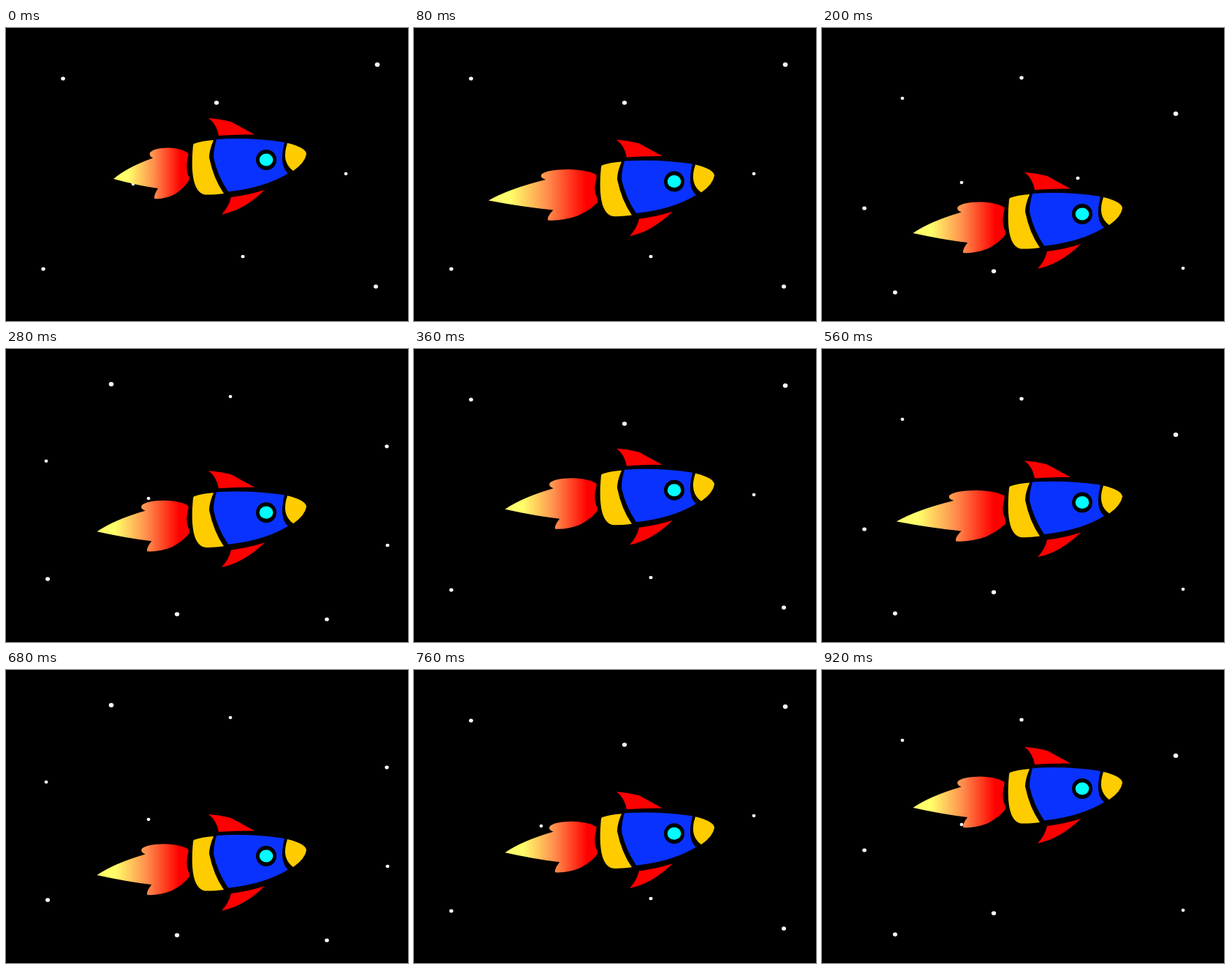
An HTML page with a canvas that plays this animation: 550x400 px, repeating every 0.96 s.

```html
<!DOCTYPE html>
<html lang="en">
<head>
<meta charset="utf-8">
<title>Rocket</title>
<style>
  html, body { margin: 0; width: 100%; height: 100%; overflow: hidden; background: #000; }
  canvas { display: block; }
</style>
</head>
<body>
<canvas id="stage" width="550" height="400"></canvas>
<script>
const ctx = document.getElementById('stage').getContext('2d');
const STEP = 40, STEPS = 24, PIVOT = 247;

// Star centres of each sky, largest star first
const skies = [
  [[508, 50], [288, 102], [506, 353], [78, 69], [51, 329], [324, 312], [174, 213], [465, 199]],
  [[484, 117], [235, 332], [100, 361], [58, 246], [273, 68], [350, 205], [191, 211], [110, 96], [494, 328]],
  [[144, 48], [234, 362], [57, 314], [439, 369], [521, 133], [522, 268], [307, 65], [55, 153], [195, 204]]
];

const shape = (color, d) => ({ color, path: new Path2D(d) });
const fire = ctx.createLinearGradient(167, 0, 239, 0);
['#ffff6a', '#ff8c4c', '#ff0000'].forEach((color, i) => fire.addColorStop(i / 2, color));

const flame = shape(fire, `M147 206Q166 190 201 177.5Q195 175 197 170Q203 163.5 222 163.5Q242 164 250 172
  Q245 188 249 201L252 205Q246 217 231 227Q217 234 203 233Q202 228 208 219Q180 215 147 206`);
const hull = [
  shape('#f00', 'M277 123Q293 124 308 128L340 145.5Q314 145 291 147Q288 131 277 123'),
  shape('#f00', 'M308 231Q332 228 354 221Q325 249 295 254.5Q305 244 308 231'),
  shape('#fc0', 'M257 158Q268 154 284 153Q278 167 278 177Q284 206 298 226Q282 228 272 227.5Q250 223 256 160'),
  shape('#0a32ff', 'M288 152Q335 149 381 156Q373 188 386 198.5Q354 218 304 223.5Q289 201 284 177Q284 165 288 152'),
  shape('#fc0', 'M385 157Q410 163 411 172Q409 184 393 195Q376 183 385 157')
];

function fill({ color, path }) {
  ctx.fillStyle = color;
  ctx.fill(path);
}

function dot(color, x, y, rx, ry) {
  ctx.fillStyle = color;
  ctx.beginPath();
  ctx.ellipse(x, y, rx, ry, 0, 0, 2 * Math.PI);
  ctx.fill();
}

function drawStars(step) {
  skies[Math.floor(step / 3) % skies.length].forEach(([x, y], i) => {
    const r = Math.max(2.4, 3.3 - i * 0.15);
    dot('#fff8ff', x, y, r, r * 0.9);
  });
}

// Dives for five steps, then climbs for six
function bob(step) {
  const p = step % 12;
  return p <= 5 ? 74 * p / 5 : 74 - 92 * (p - 5) / 6;
}

function drawFlame(step) {
  const stretch = 1.225 - 0.225 * Math.cos(step * Math.PI / 2);
  ctx.save();
  ctx.translate(PIVOT, 0);
  ctx.scale(stretch, 1);
  ctx.translate(-PIVOT, 0);
  fill(flame);
  ctx.restore();
}

function drawHull() {
  ctx.lineWidth = 11;
  ctx.lineJoin = 'round';
  for (const { path } of hull) ctx.stroke(path);
  hull.forEach(fill);
  dot('#000', 356, 180, 14, 14);
  dot('#0ff', 356, 180, 9.3, 8.5);
}

function render(now) {
  const step = Math.floor(now / STEP) % STEPS;
  ctx.clearRect(0, 0, 550, 400);
  drawStars(step);
  ctx.save();
  ctx.translate(0, bob(step));
  drawFlame(step);
  drawHull();
  ctx.restore();
}

let start;
function tick(now) {
  start ??= now;
  render(now - start);
  requestAnimationFrame(tick);
}
render(0);
requestAnimationFrame(tick);
</script>
</body>
</html>
```
